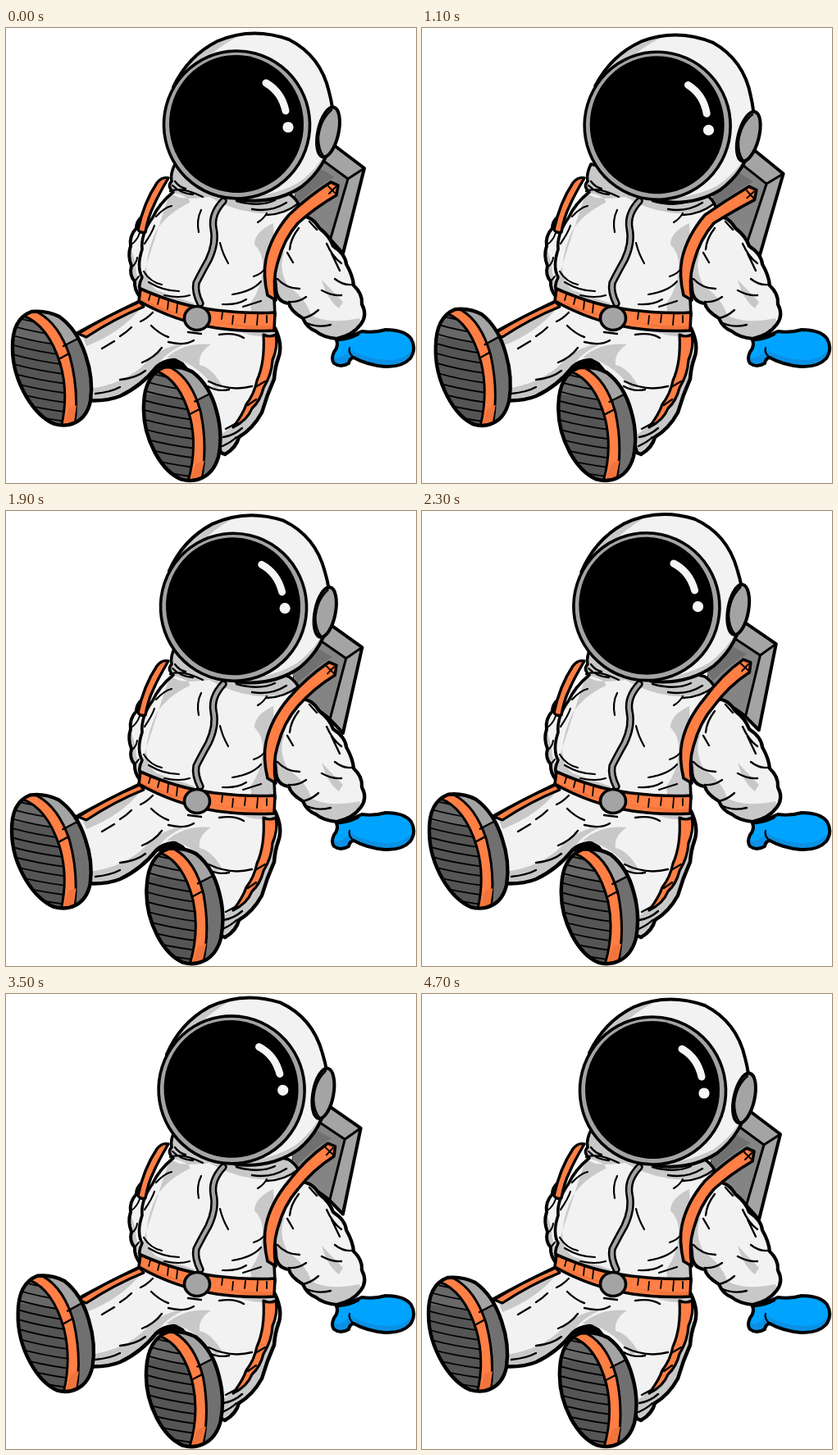
Animation of 500 by 555 pixels, one loop 4800 ms. Source, as an HTML page with a canvas:

```html
<!DOCTYPE html>
<html lang="en">
<head>
<meta charset="utf-8">
<title>Sitting astronaut</title>
<style>
html, body { margin: 0; width: 100%; height: 100%; overflow: hidden; background: #fff; }
canvas { display: block; }
</style>
</head>
<body>
<canvas id="stage" width="500" height="555"></canvas>
<script>
const ctx = document.getElementById('stage').getContext('2d');
const LOOP = 4800, STEP = 100;
const INK = '#000', SUIT = '#f2f2f2', SHADE = '#c8c8c8', ORANGE = '#ff7f45', RUST = '#f2743c',
  STEEL = '#a4a4a4', SLATE = '#707070', SOLE = '#555', BLUE = '#00a4ff', NAVY = '#0b90e4';

// [time, value] keys
const headKeys = [[0, 0], [600, .03], [1000, .037], [1500, .02], [1800, -.014], [2000, -.034],
  [2300, -.048], [3000, -.048], [4000, -.026], [4700, 0], [4800, 0]];
const leftKeys = [[0, 0], [600, .4], [900, .55], [1200, .42], [1500, .18], [1800, 0], [2100, -.12],
  [2300, .05], [2400, .1], [2700, .55], [3100, 1], [3600, .22], [3900, 0], [4800, 0]];
const rightKeys = [[0, 0], [600, -.6], [900, -.5], [1500, .4], [1900, .55], [2300, .3], [2700, .85],
  [3100, .3], [3400, .4], [4000, 1], [4300, .75], [4700, 0], [4800, 0]];

function slope(keys, i) {
  return (keys[i + 1][1] - keys[i][1]) / (keys[i + 1][0] - keys[i][0]);
}

function tangent(keys, i) {
  const n = keys.length - 1;
  const a = slope(keys, i ? i - 1 : n - 1), b = slope(keys, i < n ? i : 0);
  return a * b > 0 ? 2 * a * b / (a + b) : 0;
}

// monotone cubic through the keys
function ease(keys, t) {
  let i = 0;
  while (i < keys.length - 2 && t >= keys[i + 1][0]) i++;
  const [t0, v0] = keys[i], [t1, v1] = keys[i + 1], h = t1 - t0, u = (t - t0) / h;
  const w = u * u * (3 - 2 * u);
  return v0 + (v1 - v0) * w + h * u * (1 - u) * ((1 - u) * tangent(keys, i) - u * tangent(keys, i + 1));
}

function shape(d, fill, line = 0) {
  const p = new Path2D(d);
  if (fill) { ctx.fillStyle = fill; ctx.fill(p); }
  if (line) { ctx.lineWidth = line; ctx.strokeStyle = INK; ctx.stroke(p); }
}

function stroke(d, width = 2.4, color = INK) {
  ctx.lineWidth = width;
  ctx.strokeStyle = color;
  ctx.stroke(new Path2D(d));
}

function oval(x, y, rx, ry, tilt, fill, line = 0) {
  ctx.beginPath();
  ctx.ellipse(x, y, rx, ry, tilt, 0, 7);
  ctx.fillStyle = fill;
  ctx.fill();
  if (line) { ctx.lineWidth = line; ctx.strokeStyle = INK; ctx.stroke(); }
}

// fill, shadows kept inside, then the outline
function shaded(d, fill, shadows, tone, line) {
  shape(d, fill);
  ctx.save();
  ctx.clip(new Path2D(d));
  shape(shadows, tone);
  ctx.restore();
  shape(d, null, line);
}

function posed(draw, ...steps) {
  ctx.save();
  for (const m of steps) ctx.transform(...m);
  draw();
  ctx.restore();
}

const PIVOT = [250, 275];
function turn(a) {
  const c = Math.cos(a), s = Math.sin(a), [x, y] = PIVOT;
  return [c, s, -s, c, x - c * x + s * y, y - s * x - c * y];
}

function pack() {
  shape('M400 143L437 171L411 275L394 256L350 220L360 180Z', STEEL, 4);
  shape('M385 160L417 184L396 254L350 222L355 190Z', '#848484');
  shape('M372 165L401 182Q384 190 358 212L350 200Z', SLATE);
  stroke('M383 159L417 184L437 171M417 184L396 256', 3);
}

function leftArm() {
  shaded('M166 230Q159 236 159 244Q150 254 152 266Q148 278 153 290Q150 302 157 309Q156 319 164 329L180 320L178 240Z',
    SUIT, 'M148 262Q158 278 159 298L168 330L148 330Z', SHADE, 4);
  stroke('M153 264Q160 259 163 250M154 291Q159 287 160 280M157 309L162 303', 2);
}

function legs() {
  shaded('M164 333Q126 351 86 373L96 454Q122 456 139 449Q165 437 184 413Q199 401 215 410L240 440L262 518L267 520' +
    'Q281 512 284 499Q301 489 312 469Q318 448 327 428Q328 414 332 403Q338 387 328 366Z',
    SUIT,
    'M164 342Q141 371 98 388L92 372Z M102 440Q145 434 170 409Q186 389 226 382Q191 396 184 414Q162 441 103 460Z ' +
    'M196 402Q218 383 250 386Q234 396 236 411Q251 414 264 437L255 440Q230 405 196 402Z ' +
    'M262 496Q290 478 302 442Q310 419 314 398L334 400L304 490L262 520Z M280 368Q304 380 329 374L328 362Z',
    SHADE, 4.5);
  shape('M163 334L168 340Q133 354 98 377L88 373Q121 352 163 334Z', ORANGE, 3);
  shape('M314 374Q321 378 329 374Q332 389 325 405Q324 423 314 439Q310 455 300 464Q294 479 277 487' +
    'Q289 471 293 459Q303 446 306 430Q316 408 314 374Z', ORANGE, 3.2);
  stroke('M304 438L316 431M295 460L305 453', 2.2);
  shape('M178 418Q192 401 207 403L216 408L222 417Q205 408 178 418Z', INK);
  stroke('M109 446Q128 444 139 438M139 429Q159 427 170 418M166 408Q181 402 190 390M153 365Q146 372 139 376' +
    'M179 347Q171 355 164 358M177 363Q187 373 198 377M198 383Q218 388 229 381M222 371L238 373');
  stroke('M247 431Q274 444 300 437M246 437Q258 444 272 441M260 374Q279 371 290 378' +
    'M265 499Q278 497 288 488M264 510Q275 505 281 499M268 489L281 482M117 391L132 382');
}

function torso() {
  shaded('M206 166Q200 178 202 187Q196 193 204 200Q186 215 179 231Q164 252 166 270Q159 291 166 304Q160 316 165 324' +
    'Q211 347 264 352L328 351Q327 318 323 295Q336 258 359 229Q361 213 345 202Z',
    SUIT,
    'M200 165L196 200L212 207Q232 209 248 206Q273 221 301 225Q331 229 357 216L350 190Z ' +
    'M200 200Q226 206 224 213Q197 226 184 246Q173 268 171 292Q172 312 184 320L230 336L228 348L158 330Z ' +
    'M326 238Q303 249 303 264Q315 276 313 296Q311 318 298 336L300 356L332 354Z',
    SHADE, 3.6);
  shape('M184 189Q190 181 198 183Q185 205 180 217Q173 231 170 249Q164 251 161 246Q168 213 184 189Z', ORANGE, 3.4);
  stroke('M200 199Q214 193 240 206M203 192Q213 202 228 203M206 187Q211 194 219 196M281 211Q309 219 328 210' +
    'M300 221Q323 225 342 213M318 228Q340 227 355 215');
  stroke('M238 222Q232 234 235 249M261 262Q264 275 271 287M183 230Q193 219 202 217M169 263Q178 250 181 241' +
    'M168 297Q176 310 190 313M174 310Q192 321 211 321M193 326Q212 330 224 326M264 337Q282 338 293 331' +
    'M276 325Q301 321 311 309M307 237Q314 233 318 226M302 303Q312 300 317 292M289 340L311 333', 2.2);
  const zip = 'M265 211Q250 227 253 244Q257 262 247 283Q238 299 232 311Q230 322 237 336';
  stroke(zip, 9.5);
  stroke(zip, 4.4, STEEL);
}

function arm() {
  shaded('M360 229Q374 230 382 244Q395 254 399 266Q414 276 415 288Q423 302 424 314Q435 324 434 337Q441 350 433 361' +
    'Q423 375 403 379Q386 377 378 370Q367 366 362 354Q347 345 345 336Q329 334 329 316L326 288Q337 254 360 229Z',
    SUIT,
    'M340 271Q331 293 344 315Q366 330 372 350Q391 362 431 354L434 365L404 382L360 365L325 332L325 288Z ' +
    'M385 307Q399 322 411 334L406 342Q392 332 385 307Z',
    SHADE, 4.2);
  stroke('M357 244Q347 257 346 270M343 274L350 286M331 306Q342 318 358 318M345 334Q356 335 366 328' +
    'M362 354Q372 352 381 344M367 360Q380 366 396 362M397 275L407 296' +
    'M391 263Q398 279 409 287M401 306Q411 314 422 313M385 320Q398 327 409 326M370 236L379 246');
}

function glove() {
  shaded('M403 381Q416 378 434 370Q449 372 463 368Q486 368 494 379Q501 391 493 403Q483 414 462 413Q440 411 424 402' +
    'Q419 403 418 409Q408 415 400 409Q396 404 400 395Q406 388 403 381Z',
    BLUE, 'M399 401Q410 406 419 392Q443 405 466 405Q485 405 497 391L496 415L398 415Z', NAVY, 4);
  stroke('M424 402Q417 396 419 390M407 381Q419 380 430 374', 2.2);
}

function strap(a) {
  const m = turn(a);
  const at = (x, y) => [m[0] * x + m[2] * y + m[4], m[1] * x + m[3] * y + m[5]].map(v => v.toFixed(1)).join(' ');
  shape(`M${at(396, 188)}L${at(405, 192)}L${at(403, 204)}Q${at(377, 219)} 356 238Q339 257 331 287Q325 307 329 332` +
    `L319 326Q313 301 317 282Q323 254 345 228Q${at(368, 206)} ${at(396, 188)}Z`, ORANGE, 3.6);
  stroke(`M${at(393, 193)}L${at(402, 202)}M${at(402, 194)}L${at(394, 202)}`, 2);
}

function belt() {
  shaded('M164 318Q211 339 255 344Q298 349 328 347L327 369Q293 371 257 366Q206 358 162 333Z',
    ORANGE, 'M160 329Q211 351 254 358Q300 365 330 363L329 373L160 340Z', RUST, 3.6);
  stroke('M176 325L174 332M187 329L185 337M198 333L197 343M209 337L208 347M264 347L263 355M277 351L276 361' +
    'M292 350L291 359M307 350L306 362M318 351L318 359', 1.8);
  oval(233, 354, 15.5, 14.5, 0, STEEL, 3.6);
}

function head() {
  shaded('M204 72Q222 34 258 16Q300 -2 345 14Q384 34 394 78Q402 108 398 132Q391 170 360 194Q326 216 282 209L230 160Z',
    SUIT,
    'M198 78Q220 30 262 8L294 5Q250 24 216 68Z ' +
    'M400 128Q389 166 356 189Q322 208 270 207L285 222L370 212L406 150Z',
    SHADE, 4);
  oval(281.5, 118, 89, 90, -.12, STEEL, 3.6);
  oval(281, 117, 82, 84, -.12, INK);
  stroke('M317 67Q336 78 341 101', 9, '#f6f6f6');
  oval(344, 121, 6.6, 6.6, 0, '#f6f6f6');
  oval(393, 127, 12.5, 31, .22, STEEL, 4);
  stroke('M397 100Q383 112 381 134Q381 148 387 156', 2.4);
}

const BOOT = 'M31 346Q49 344 65 352Q87 368 97 399Q107 428 103 455Q99 474 85 481Q73 487 59 483Q40 475 25 450' +
  'Q8 421 8 391Q7 355 31 346Z';

function boot() {
  shape(BOOT, SLATE);
  ctx.save();
  ctx.clip(new Path2D(BOOT));
  shape('M0 340H40Q69 382 72 430Q76 465 65 490H0Z', SOLE);
  shape('M8 345L26 352Q44 360 58 384L9 379Z', '#686868');
  for (let i = 0; i < 11; i++) {
    const y = 351 + i * 11.5;
    stroke(`M4 ${y}Q35 ${y + 9} 74 ${y + 14}`, 1.8);
  }
  shape('M38 340L64 346L92 376L72 386Q63 362 38 348Z', STEEL);
  shape('M21 351Q29 344 39 347Q65 361 78 401Q90 446 83 488L67 488Q77 447 66 409Q51 362 21 351Z', ORANGE, 3);
  shape('M76 464L86 460L82 488L69 488Z', RUST);
  stroke('M70 388L91 377M66 403L77 397', 2.4);
  ctx.restore();
  shape(BOOT, null, 4.4);
}

function draw(t) {
  const a = ease(headKeys, t), k = ease(leftKeys, t), m = ease(rightKeys, t);
  ctx.setTransform(1, 0, 0, 1, 0, 0);
  ctx.fillStyle = '#fff';
  ctx.fillRect(0, 0, 500, 555);
  ctx.lineJoin = ctx.lineCap = 'round';
  posed(pack, turn(a));
  leftArm();
  legs();
  torso();
  arm();
  glove();
  strap(a);
  belt();
  posed(head, turn(a));
  posed(boot, [1 - .074 * k, 0, -.07 * k, 1 + .05 * k, 46.1 * k, -23.3 * k]);
  posed(boot, [1, 0, -.03 * m, 1 + .023 * m, 20.35 * m, -12.5 * m], [1, 0, -.06, 1, 183.5, 67.5]);
}

const start = performance.now();
function tick(now) {
  const t = Math.max(0, now - start) % LOOP;
  draw(Math.floor(t / STEP) * STEP);
  requestAnimationFrame(tick);
}
draw(0);
requestAnimationFrame(tick);
</script>
</body>
</html>
```
